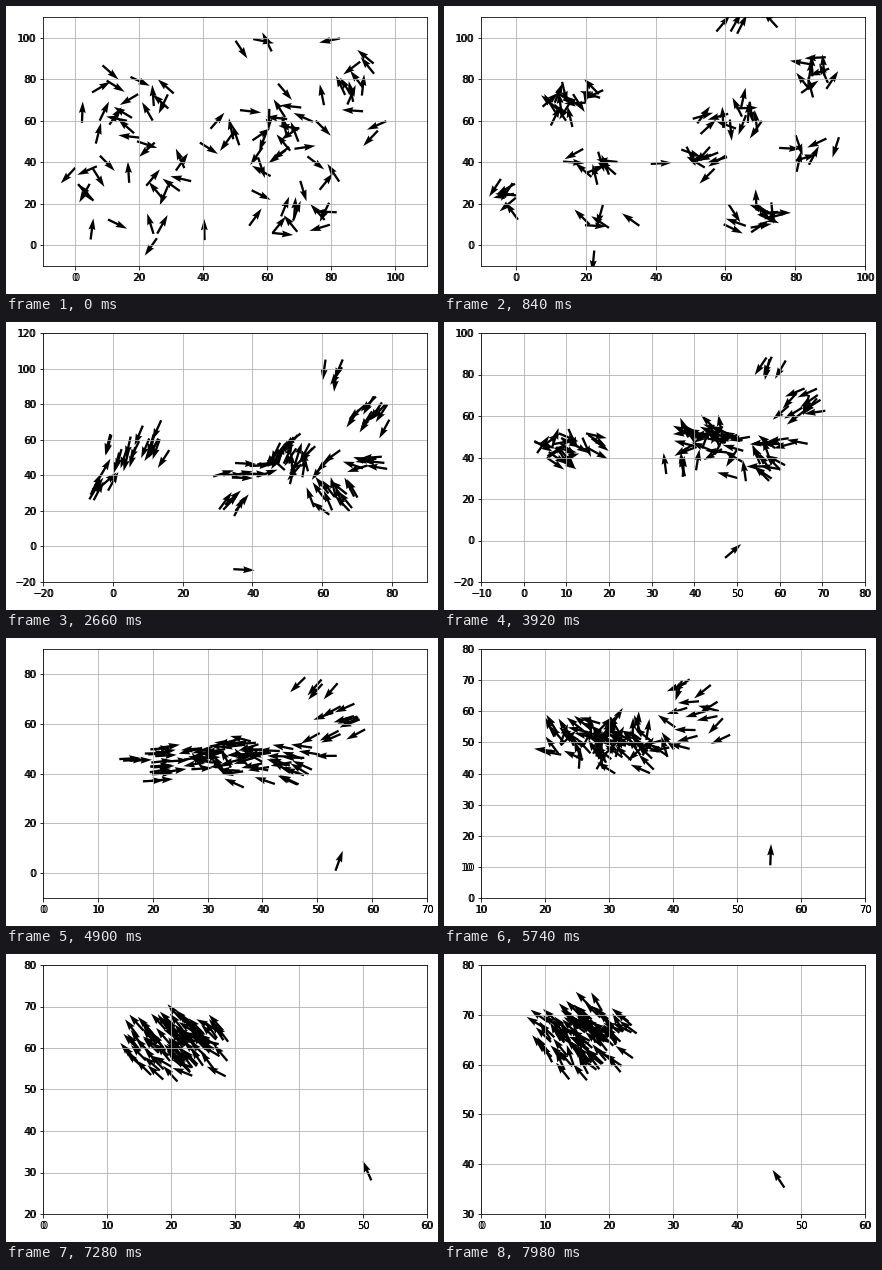
A matplotlib script that plays this animation: 432 px wide and 288 px high, repeating every 8 s.

```python
import matplotlib.pyplot as plt
import numpy as np
from matplotlib.animation import FuncAnimation

STEP_MS, TICK_MS, LOOP_MS = 140, 20, 8000
SPEED = 1.55
KEYS = np.array([0, 11, 28, 41, 48, 57])        # steps at which paths have a key point
STRAY = [(25.6, 3.4), (24.4, -7.6), (47.2, -8.4), (55.2, 10.5), (53.5, 22), (47.4, 35.3)]

# size and centre of the flocks that form first
FLOCKS = [(7, -6.5, 24), (18, 12.5, 69), (9, 22, 39.5), (5, 26, 13), (10, 51, 39),
          (15, 62, 61), (4, 67, 107), (11, 84, 82), (7, 84, 46), (13, 68, 16)]
WEST, CORE = (8, 47), (46, 48)
# later meeting places and how far a flock gets towards each
MEETINGS = [((28, 49), 24), ((24.5, 55.5), 14), ((16.5, 64.5), 15)]

rng = np.random.default_rng(12)


def unit(a):
    return np.stack([np.cos(a), np.sin(a)], -1)


def approach(p, goal, reach):
    """Move p towards goal by at most reach."""
    gap = np.asarray(goal) - p
    dist = np.linalg.norm(gap, axis=-1, keepdims=True)
    return p + gap * np.minimum(1, reach / np.maximum(dist, 1e-9))


def key_points():
    """Path points of all birds and their first headings."""
    table = np.array(FLOCKS, float)
    size = table[:, 0].astype(int)
    stops = [table[:, 1:]]
    side = np.where(stops[0][:, :1] < 20, WEST, CORE)
    stops.append(approach(stops[0], side, 22))
    for goal, reach in MEETINGS:
        stops.append(approach(stops[-1], goal, reach))

    n = size.sum()
    radius = np.repeat(2 * np.sqrt(size - 1), size) * np.sqrt(rng.random(n))
    offset = unit(rng.uniform(0, 2 * np.pi, n)) * radius[:, None]
    places = np.repeat(np.stack(stops, 1), size, 0) + offset[:, None]

    # birds start scattered around their flock, inside a 100 x 100 field
    head = rng.uniform(-np.pi, np.pi, n)
    home = places[:, 0] - unit(head) * rng.uniform(7, 18, (n, 1))
    edge = rng.uniform(0, 7, home.shape)
    home = home.clip(edge, 100 - edge)
    head += rng.uniform(-1, 1, n)

    pts = np.concatenate([home[:, None], places], 1)
    return np.concatenate([pts, [STRAY]]), np.append(head, np.radians(-125))


def tangents(pts, head):
    """Headings at the key points, noisier early on; the stray flies true."""
    dt = np.diff(KEYS)[None, :, None]
    vel = np.diff(pts, axis=1) / dt
    mid = (vel[:, :-1] * dt[:, 1:] + vel[:, 1:] * dt[:, :-1]) / (dt[:, 1:] + dt[:, :-1])
    end = 2 * vel[:, -1:] - mid[:, -1:]
    tan = np.concatenate([mid, end], 1)
    ang = np.arctan2(tan[..., 1], tan[..., 0])
    noise = rng.normal(size=ang.shape) * np.radians(np.linspace(24, 10, ang.shape[1]))
    noise[-1] = 0
    return SPEED * unit(np.concatenate([head[:, None], ang + noise], 1))


def fly():
    """Positions and headings for all steps, as cubic paths through the keys."""
    pts, head = key_points()
    tan = tangents(pts, head)
    pos, heading = [], []
    for s in range(KEYS[-1] + 1):
        k = min(np.searchsorted(KEYS, s, side="right") - 1, len(KEYS) - 2)
        h = KEYS[k + 1] - KEYS[k]
        u = (s - KEYS[k]) / h
        p, a, b = pts[:, k], tan[:, k] * h, tan[:, k + 1] * h
        gap = pts[:, k + 1] - p
        c2, c3 = 3 * gap - 2 * a - b, a + b - 2 * gap
        pos.append(p + u * (a + u * (c2 + u * c3)))
        d = a + u * (2 * c2 + 3 * u * c3)
        heading.append(d / np.maximum(np.hypot(*d.T), 1e-9)[:, None])
    return np.array(pos), np.array(heading)


pos, heading = fly()
low = np.floor((pos.min(1) - 5) / 10) * 10
high = np.ceil((pos.max(1) + 5) / 10) * 10

W, H = 432, 288
fig = plt.figure(figsize=(W / 72, H / 72), dpi=72)


def add_axes(x, **kw):
    return fig.add_axes([x / W, 28 / H, 384 / W, 249 / H], **kw)


ax = add_axes(37)
ax.grid(True)
# the labels are printed twice, one pixel apart
over = add_axes(38, sharex=ax, sharey=ax, frameon=False)
over.tick_params(length=0, pad=7)
birds = ax.quiver(*pos[0].T, *heading[0].T, scale=18, width=0.006)


def update(i):
    s = min(i * TICK_MS // STEP_MS, len(pos) - 1)
    birds.set_offsets(pos[s])
    birds.set_UVC(*heading[s].T)
    ax.set_xlim(low[s, 0], high[s, 0])
    ax.set_ylim(low[s, 1], high[s, 1])
    return birds,


anim = FuncAnimation(fig, update, frames=LOOP_MS // TICK_MS, interval=TICK_MS,
                     init_func=lambda: update(0), repeat=True, repeat_delay=0)
plt.show()
```
